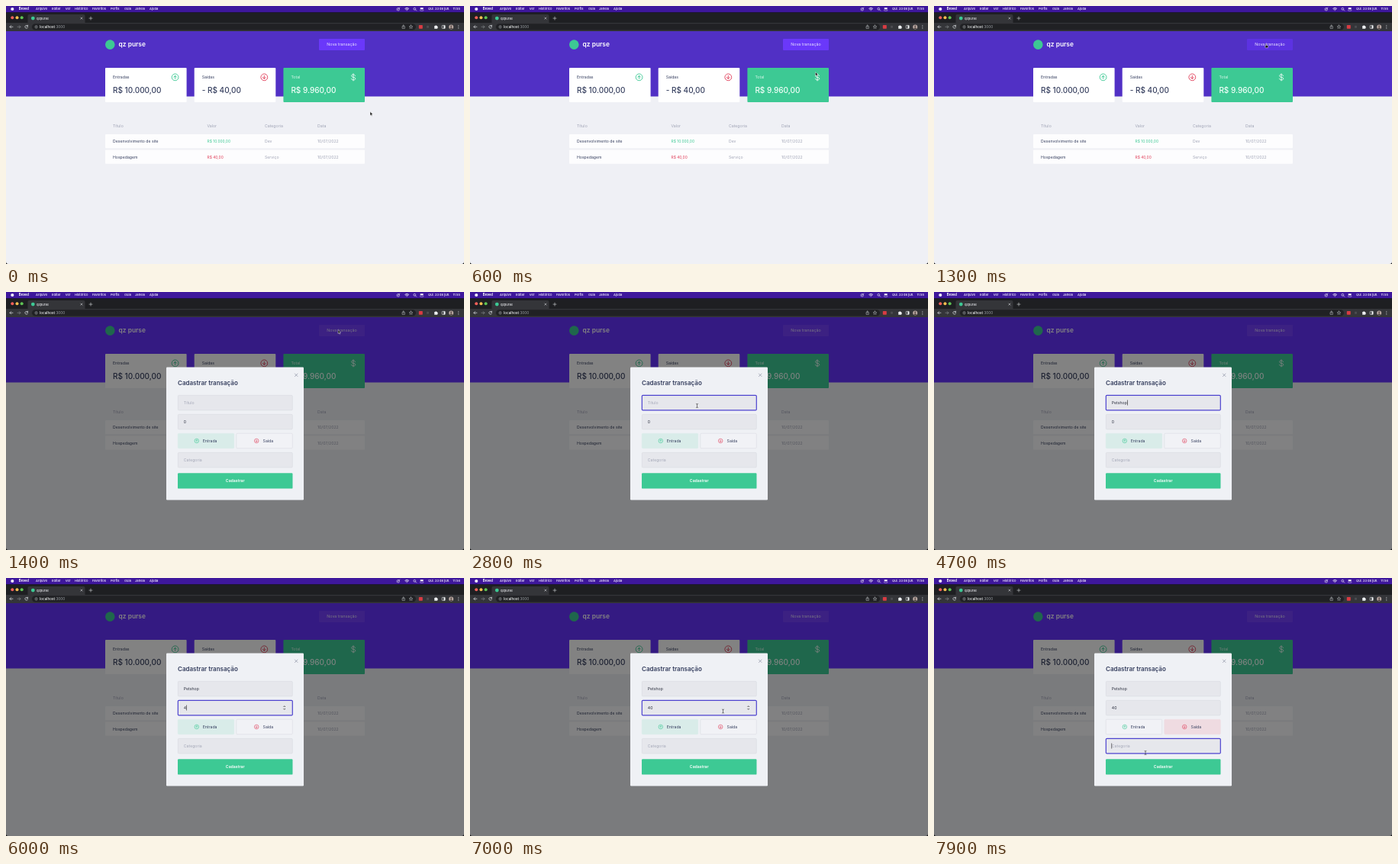
Recreate the animation shown at these times as an HTML page. Size 600 px wide and 338 px high, loop 8 s.

```html
<!DOCTYPE html>
<html lang="pt-BR">
<head>
<meta charset="utf-8">
<title>qz purse</title>
<style>
  html, body { margin: 0; width: 100%; height: 100%; overflow: hidden; background: #000; }
  svg { display: block; width: 600px; height: 338px; font-family: Inter, "Open Sans", sans-serif; }
  .line { fill: none; stroke-linecap: round; stroke-linejoin: round; }
  .band { fill: #5130c5; }
  .cta { fill: #6a38fa; }
  .cta.hover { fill: #5c32e2; }
  .dim .band { fill: #6632ff; }
  .dim .cta { fill: #7641ff; }
</style>
</head>
<body>
<svg id="stage" viewBox="0 0 600 338" xmlns="http://www.w3.org/2000/svg"></svg>
<script>
const LOOP = 8000, STEP = 100;
const GREEN = '#3dc994', RED = '#e03d58', INK = '#363f5f', GREY = '#a0a4b6';
const INPUT = '#e6e7ec', EDGE = '#d5d7dd', FOCUS = '#4d43cf';
const NS = 'http://www.w3.org/2000/svg';
const stage = document.getElementById('stage');

function add(parent, tag, attrs, content) {
  const el = document.createElementNS(NS, tag);
  for (const k in attrs) el.setAttribute(k, attrs[k]);
  if (content !== undefined) el.textContent = content;
  parent.appendChild(el);
  return el;
}
const group = (parent, attrs = {}) => add(parent, 'g', attrs);
const rect = (parent, x, y, width, height, fill, rx = 0, more = {}) =>
  add(parent, 'rect', { x, y, width, height, fill, rx, ...more });
const circle = (parent, cx, cy, r, fill, more = {}) =>
  add(parent, 'circle', { cx, cy, r, fill, ...more });
const line = (parent, d, stroke, w = 0.7) =>
  add(parent, 'path', { d, stroke, 'stroke-width': w, class: 'line' });
const text = (parent, x, y, str, size, fill, weight = 400, anchor = 'start') =>
  add(parent, 'text', { x, y, 'font-size': size, fill, 'font-weight': weight, 'text-anchor': anchor }, str);

function arrowIcon(parent, x, y, r, color, up) {
  const s = r / 4.4;
  const g = group(parent, { transform: `translate(${x} ${y}) scale(${s} ${up ? s : -s})` });
  circle(g, 0, 0, 4.4, 'none', { stroke: color, 'stroke-width': 0.9 });
  line(g, 'M0 2V-2M-1.9-.1L0-2L1.9-.1', color, 0.9);
}

// Page
const page = group(stage);
rect(page, 0, 33, 600, 305, '#eff0f5');
add(page, 'rect', { y: 33, width: 600, height: 85.5, class: 'band' });
circle(page, 136.3, 50.6, 6.3, GREEN);
text(page, 147.6, 53.3, 'qz purse', 8.4, '#fff', 600);
const cta = add(page, 'rect', { x: 410, y: 43, width: 60, height: 15, rx: 1, class: 'cta' });
text(page, 440, 52.4, 'Nova transação', 5.3, '#e9e3ff', 400, 'middle');

[['Entradas', 'R$ 10.000,00'], ['Saídas', '- R$ 40,00'], ['Total', 'R$ 9.960,00']]
  .forEach(([label, value], i) => {
    const x = 130 + i * 116.7, total = i === 2;
    rect(page, x, 81, 106.6, 45, total ? GREEN : '#fff', 1);
    text(page, x + 10, 95.2, label, 5.2, total ? '#d9f6e9' : INK);
    text(page, x + 10, 114.4, value, 10, total ? '#f4fffa' : INK, 500);
  });
arrowIcon(page, 221.6, 93.3, 4.4, GREEN, true);
arrowIcon(page, 338.3, 93.3, 4.4, RED, false);
line(page, 'M455 88.7V97.9M457.6 91.4C457.6 89.4 452.5 89.2 452.5 91.5C452.5 94 457.8 92.6 457.8 95.2C457.8 97.6 452.3 97.5 452.3 95.2', '#fff', 0.8);

const columns = [140, 263.5, 339, 408];
['Título', 'Valor', 'Categoria', 'Data'].forEach((s, i) => text(page, columns[i], 158.8, s, 5.2, GREY));
[['Desenvolvimento de site', 'R$ 10.000,00', 'Dev', '10/07/2022'],
 ['Hospedagem', 'R$ 40,00', 'Serviço', '10/07/2022']].forEach((row, r) => {
  const y = 168 + r * 20.6;
  rect(page, 130, y, 340, 18.2, '#fdfdfe', 1);
  row.forEach((s, i) => text(page, columns[i], y + 11, s, i === 1 ? 4.9 : 5.15,
    [INK, r ? RED : GREEN, GREY, GREY][i]));
});

// Modal
const modal = group(stage);
rect(modal, 0, 33, 600, 305, '#000', 0, { opacity: 0.49 });
rect(modal, 210, 98.5, 180, 174, '#eff1f5', 1.2);
line(modal, 'M378.4 107L382 110.6M382 107L378.4 110.6', '#8b90a3');
text(modal, 225, 122.2, 'Cadastrar transação', 8, INK, 600);

function field(y, hint) {
  const box = rect(modal, 225.3, y + 0.3, 150, 19.6, INPUT, 1.2);
  const mark = rect(modal, 232.5, y + 6.6, 4, 7, '#a9c8f8');
  const label = text(modal, 232.8, y + 12, '', 5.2, INK);
  const caret = rect(modal, 0, y + 6.5, 0.6, 7, '#222');
  return (value, focused, showCaret, selected = false) => {
    box.setAttribute('stroke', focused ? FOCUS : EDGE);
    box.setAttribute('stroke-width', focused ? 1.2 : 0.5);
    label.textContent = value || hint;
    label.setAttribute('fill', value ? '#2b2f3f' : '#a5a8b8');
    caret.setAttribute('x', 232.8 + (value ? label.getComputedTextLength() + 0.2 : -0.3));
    show(caret, showCaret);
    show(mark, selected);
  };
}
const titleField = field(135, 'Título');
const valueField = field(160, '0');
const spinner = group(modal);
line(spinner, 'M363.7 168.7L364.7 167.7L365.7 168.7M363.7 171.3L364.7 172.3L365.7 171.3', '#333', 0.8);

function option(x, label, color, tint, up) {
  const box = rect(modal, x, 185.2, 73.5, 19.6, 'none', 1.2, { 'stroke-width': 0.5 });
  arrowIcon(modal, x + (up ? 24.6 : 26.4), 195, 2.8, color, up);
  text(modal, x + (up ? 32.5 : 34.8), 197, label, 5.2, INK);
  return on => {
    box.setAttribute('fill', on ? tint : '#f1f2f6');
    box.setAttribute('stroke', on ? tint : EDGE);
  };
}
const income = option(225.2, 'Entrada', GREEN, '#d9ece9', true);
const outcome = option(301.8, 'Saída', RED, '#efdbe1', false);
const categoryField = field(210, 'Categoria');
rect(modal, 225, 237.3, 150.5, 20.3, GREEN, 1.2);
text(modal, 300.2, 249.3, 'Cadastrar', 5.2, '#fff', 600, 'middle');

// Desktop menu bar
const bars = group(stage);
rect(bars, 0, 0, 600, 8.5, '#3e179c');
circle(bars, 8.3, 4, 2.1, '#f4f0ff');
text(bars, 16.8, 5.3, 'Brovel', 4.3, '#fff', 700);
[[39, 'Arquivo'], [60, 'Editar'], [77.8, 'Ver'], [90, 'Histórico'], [113, 'Favoritos'],
 [137, 'Perfis'], [155, 'Guia'], [169, 'Janela'], [188, 'Ajuda']]
  .forEach(([x, s]) => text(bars, x, 5.3, s, 4.1, '#f4f0ff', 500));
line(bars, 'M512.2 5.7L515.8 2M511.9 4.3A1.8 1.8 0 1 1 513.6 6.1', '#fff', 0.6);
line(bars, 'M522.8 3.2Q525.2 1.2 527.6 3.2M523.8 4.4Q525.2 3.2 526.6 4.4M525.2 5.7V5.8', '#fff', 0.8);
circle(bars, 535.3, 3.7, 1.4, 'none', { stroke: '#fff', 'stroke-width': 0.6 });
line(bars, 'M536.4 4.8L537.7 6.1', '#fff', 0.6);
rect(bars, 542.5, 2.2, 4.4, 1.7, '#fff', 0.8);
rect(bars, 542.5, 4.6, 4.4, 1.7, 'none', 0.8, { stroke: '#fff', 'stroke-width': 0.4 });
text(bars, 553, 5.3, 'Qui. 23 de jun.', 4.1, '#fff', 500);
const clock = text(bars, 595, 5.3, '', 4.1, '#fff', 500, 'end');

// Browser window
rect(bars, 0, 8.5, 600, 15, '#1e1f22');
rect(bars, 0, 22, 600, 11, '#343539');
rect(bars, 28.5, 11, 75, 13, '#343539', 2);
['#f4605a', '#f6be4f', '#5fc454'].forEach((c, i) => circle(bars, 8.3 + i * 6.2, 15.3, 2, c));
circle(bars, 35.3, 16.1, 2.4, GREEN);
text(bars, 40, 17.7, 'qzpurse', 4.1, '#e8eaed', 500);
line(bars, 'M97.8 15L100 17.2M100 15L97.8 17.2M109 16.1H113M111 14.1V18.1', '#d5d7da', 0.6);
rect(bars, 34, 23.2, 503, 8.4, '#202124', 4.2);
line(bars, 'M9 27.3H5M6.7 25.6L5 27.3L6.7 29', '#dcdee2');
line(bars, 'M15 27.3H19M17.3 25.6L19 27.3L17.3 29', '#85888d');
line(bars, 'M28.3 26.1A1.9 1.9 0 1 0 28.6 27.9M28.6 25.1V26.5H27.2', '#dcdee2');
circle(bars, 39.6, 27.4, 1.7, 'none', { stroke: '#b5b8bd', 'stroke-width': 0.5 });
line(bars, 'M39.6 27.3V28.1M39.6 26.5V26.5', '#b5b8bd', 0.5);
const address = text(bars, 44, 29, 'localhost', 4.6, '#f1f3f4', 500);
add(address, 'tspan', { fill: '#8b8f95' }, ':3000');
line(bars, 'M519.8 26.6H519V29.4H522.4V26.6H521.6M520.7 28V25M519.8 25.8L520.7 24.9L521.6 25.8', '#c5c8cc', 0.5);
line(bars, 'M530.5 25L531.2 26.6L532.9 26.7L531.6 27.8L532 29.4L530.5 28.5L529 29.4L529.4 27.8L528.1 26.7L529.8 26.6Z', '#c5c8cc', 0.5);
rect(bars, 540.8, 25, 5, 4.7, '#d93c43', 0.7);
rect(bars, 551, 25.8, 3, 3, '#4b4c50', 0.6);
add(bars, 'path', { d: 'M561.2 26H562.4A.8.8 0 0 1 564 26H565.2V27.2A.8.8 0 0 1 565.2 28.8V29.7H561.2Z', fill: '#eceef0' });
rect(bars, 571.2, 25.4, 4, 4, 'none', 0.5, { stroke: '#eceef0', 'stroke-width': 0.6 });
rect(bars, 573.4, 25.4, 1.8, 4, '#eceef0');
circle(bars, 583.2, 27.4, 3, '#b9a9a2');
circle(bars, 583.2, 26.6, 1.1, '#574a48');
add(bars, 'path', { d: 'M581.2 29.6Q583.2 26.6 585.2 29.6Q583.2 31 581.2 29.6Z', fill: '#574a48' });
[0, 1, 2].forEach(i => circle(bars, 592.8, 25.6 + i * 1.8, 0.5, '#dcdee2'));
add(bars, 'path', { d: 'M0 335V338H3Q0 338 0 335ZM600 335V338H597Q600 338 600 335Z', fill: '#000' });

// Pointer shapes
const pointer = group(stage);
const shapes = { arrow: group(pointer), hand: group(pointer), beam: group(pointer) };
const solid = { fill: '#111', stroke: '#fff', 'stroke-width': 0.45 };
add(shapes.arrow, 'path', { d: 'M0 0V5L1.2 3.9L2 5.7L2.8 5.3L2 3.6H3.6Z', ...solid });
add(shapes.hand, 'path', { d: 'M-.5 0Q0-.7.5 0V2L2.4 2.4Q3 2.6 2.8 3.6L2.3 5.3H-.5L-1.8 3.4Q-1.7 2.7-.5 3.3Z', ...solid });
line(shapes.beam, 'M-1-2.5Q0-2.5 0-1.8Q0-2.5 1-2.5M0-1.8V1.8M-1 2.5Q0 2.5 0 1.8Q0 2.5 1 2.5', '#333', 0.6);

// time, x, y
const path = [
  [0, 477, 138.5], [100, 477, 138.5], [1000, 435, 49.5], [1800, 435, 49.5], [2600, 297.5, 149],
  [6500, 297.5, 149], [7000, 331.5, 174.5], [7300, 339, 194], [7400, 339, 194], [7800, 277, 229], [8000, 277, 229]
];
// time, value
const titleKeys = [[0, ''], [3300, 'P'], [3500, 'Pe'], [3700, 'Pet'], [4000, 'Pets'], [4200, 'Petsh'], [4500, 'Petsho'], [4700, 'Petshop']];
const valueKeys = [[0, '0'], [6000, '4'], [6200, '40']];
const focusKeys = [[0, ''], [2700, 'title'], [5200, 'value'], [7400, ''], [7800, 'category']];

function show(el, on) { el.style.display = on ? '' : 'none'; }
const at = (keys, t) => keys.filter(k => k[0] <= t).pop()[1];
const ease = p => p * p * (3 - 2 * p);

function pointerAt(t) {
  const i = path.findIndex(k => k[0] > t);
  const [t0, x0, y0] = path[i - 1], [t1, x1, y1] = path[i];
  const p = ease((t - t0) / (t1 - t0));
  return [x0 + (x1 - x0) * p, y0 + (y1 - y0) * p];
}
const inside = (x, y, l, t, r, b) => x >= l && x <= r && y >= t && y <= b;

function shapeAt(x, y, open) {
  if (!open) return inside(x, y, 410, 43, 470, 58) ? 'hand' : 'arrow';
  const over = top => inside(x, y, 225, top, 376, top + 20);
  if ([185, 237].some(over)) return 'hand';
  return [135, 160, 210].some(over) ? 'beam' : 'arrow';
}

function draw(t) {
  const open = t >= 1400, focus = at(focusKeys, t);
  const [x, y] = pointerAt(t);
  const shape = shapeAt(x, y, open);
  const onValue = focus === 'value', onCategory = focus === 'category';
  show(modal, open);
  page.classList.toggle('dim', open);
  cta.classList.toggle('hover', !open && shape === 'hand');

  titleField(at(titleKeys, t), focus === 'title', focus === 'title' && t >= 2900);
  valueField(at(valueKeys, t), onValue, onValue && t >= 6000 && t < 6800, onValue && t < 6000);
  categoryField('', onCategory, onCategory);
  show(spinner, onValue);
  income(t < 7400);
  outcome(t >= 7400);
  clock.textContent = t < 6000 ? '11:55' : '11:56';

  show(pointer, t < 3400 || t >= 6500);
  pointer.setAttribute('transform', `translate(${x} ${y})`);
  for (const name in shapes) show(shapes[name], name === shape);
}

const start = performance.now();
function tick() {
  const t = (performance.now() - start) % LOOP;
  draw(Math.floor(t / STEP) * STEP);
  requestAnimationFrame(tick);
}
tick();
</script>
</body>
</html>
```
